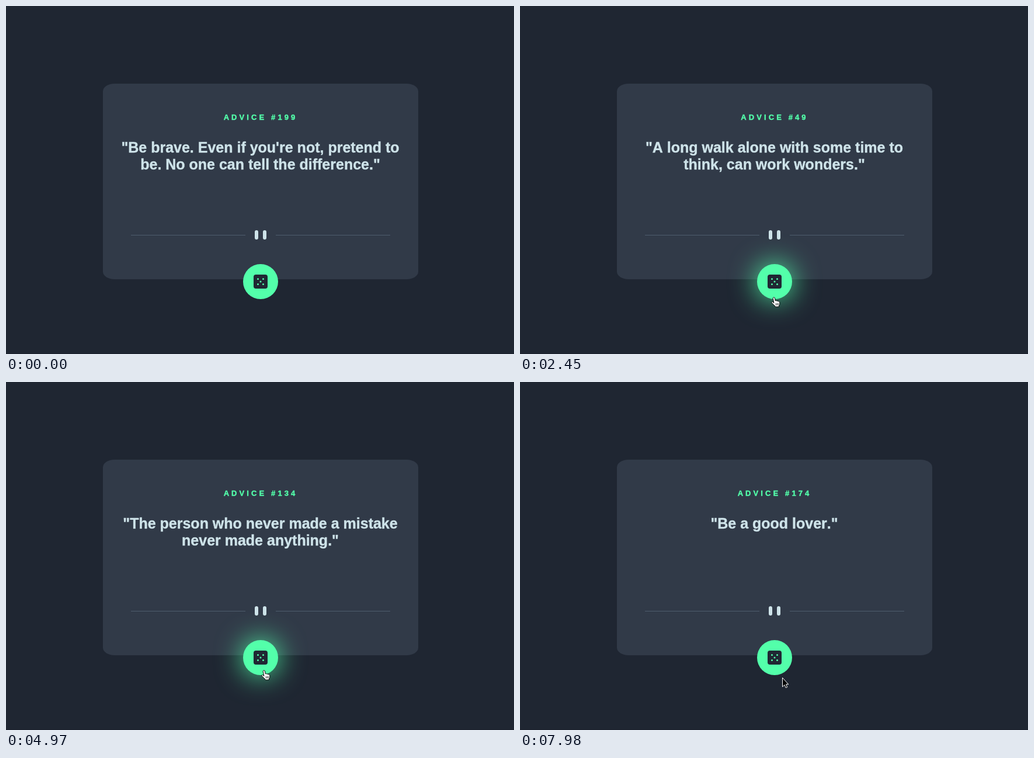
Write an HTML page that moves like this. It is 870 px wide and 596 px high and loops after 8000 ms.

```html
<!DOCTYPE html>
<html lang="en">
<head>
<meta charset="utf-8">
<title>Advice card</title>
<style>
  html, body { margin: 0; width: 100%; height: 100%; overflow: hidden; background: #1f2632; }
  svg { display: block; }
  text { font-family: "Liberation Sans", Helvetica, Arial, sans-serif; font-weight: bold; font-kerning: none; text-anchor: middle; stroke-width: .4px; }
  .label { font-size: 13px; letter-spacing: 4.1px; fill: #53ffaa; stroke: #53ffaa; }
  .quote { font-size: 25px; fill: #cee3e9; stroke: #cee3e9; }
  #glow { filter: blur(24px); }
</style>
</head>
<body>
<svg width="870" height="596" viewBox="0 0 870 596">
  <rect width="870" height="596" fill="#1f2632"/>
  <rect y="595" width="870" height="1" fill="#1b212c"/>
  <rect x="166" y="133" width="540" height="335" rx="20" ry="13" fill="#313a48"/>
  <text id="label" class="label" x="436" y="195"/>
  <text id="line1" class="quote" x="435.5" y="251"/>
  <text id="line2" class="quote" x="435.5" y="280"/>

  <path d="M214 392h196v1H214zM462 392h196v1H462z" fill="#4f5d6e"/>
  <path d="M429 387v10M443 387v10" stroke="#cee3e9" stroke-width="6" stroke-linecap="round"/>

  <circle id="glow" cx="436" cy="472" r="30" fill="#53ffaa"/>
  <circle cx="436" cy="472" r="30" fill="#53ffaa"/>
  <g transform="translate(424 460)">
    <rect width="24" height="24" rx="4" fill="#202733"/>
    <path d="M7.5 7.5h0M16.5 7.5h0M12 12h0M7.5 16.5h0M16.5 16.5h0" stroke="#53ffaa" stroke-width="3" stroke-linecap="round"/>
  </g>

  <g id="cursor">
    <g id="ring" fill="none">
      <circle r="29" stroke="#fff" stroke-width="5.4"/>
      <circle r="29" stroke="#000" stroke-width="3.2"/>
    </g>
    <path id="arrow" d="M.5 .5V16L4 12.7L6.2 17.6L8.7 16.6L6.6 11.8H10.8Z" stroke="#fff"/>
    <g id="hand" stroke="#000" stroke-linejoin="round" stroke-linecap="round">
      <path d="M-1.8 2.2C-1.8 .6 .8 .4 1.3 2L2.4 7C3 6 4.6 6.2 4.9 7.4C5.6 6.6 7 6.9 7.3 8C8.2 7.4 9.6 8 9.7 9.4C10 12 9.6 13.5 8.6 15.2L8.4 17L2.4 17.2L1.6 15.6C-.5 14-2 12.2-3.8 10.4C-4.8 9.2-3.2 8-1.8 9L-.4 10.4Z" fill="#fff"/>
      <path d="M3.2 11.5l.2 2.6M5.3 11.3l.1 2.8M7.3 11.2v2.8" fill="none" stroke-width=".8"/>
    </g>
  </g>
</svg>
<script>
const LOOP = 8000, STEP = 70;
const REPLY = 4 * STEP; // from a click to the next advice
const button = { x: 436, y: 472, r: 30 };

const advice = [
  { click: -REPLY, number: 199, lines: [`"Be brave. Even if you're not, pretend to`, `be. No one can tell the difference."`] },
  { click: 1960, number: 49, lines: [`"A long walk alone with some time to`, `think, can work wonders."`] },
  { click: 4130, number: 134, lines: [`"The person who never made a mistake`, `never made anything."`] },
  { click: 7140, number: 174, lines: [`"Be a good lover."`, ""] },
];

// The pointer rests between moves.
const entry = { time: 210, x: 449, y: 534 };
const moves = [
  { from: 210, to: 980, x: 441, y: 510 },
  { from: 1050, to: 1470, x: 432, y: 484 },
  { from: 2240, to: 3010, x: 447, y: 558 },
  { from: 3080, to: 3710, x: 438, y: 475 },
  { from: 4760, to: 5250, x: 447, y: 520 },
  { from: 5950, to: 6580, x: 441, y: 477 },
  { from: 7770, to: 7980, x: 449, y: 506 },
];

const $ = id => document.getElementById(id);
const show = (id, on) => $(id).setAttribute("visibility", on ? "visible" : "hidden");

function ease(t, from, to) {
  const u = Math.min(1, Math.max(0, (t - from) / (to - from)));
  return u * u * (3 - 2 * u);
}

function pointerAt(t) {
  let { x, y } = entry;
  for (const m of moves) {
    const k = ease(t, m.from, m.to);
    x += (m.x - x) * k;
    y += (m.y - y) * k;
  }
  return [Math.round(x), Math.round(y)];
}

function draw(now) {
  const t = Math.floor(now % LOOP / STEP) * STEP;

  const { number, lines } = advice.findLast(a => a.click + REPLY <= t);
  $("label").textContent = "ADVICE #" + number;
  $("line1").textContent = lines[0];
  $("line2").textContent = lines[1];

  const [x, y] = pointerAt(t);
  const visible = t >= entry.time;
  const hover = visible && Math.hypot(x - button.x, y - button.y) < button.r;
  $("cursor").setAttribute("transform", `translate(${x} ${y})`);
  show("glow", hover);
  show("hand", hover);
  show("arrow", visible && !hover);
  show("ring", advice.some(a => a.click === t));
}

function tick() {
  draw(performance.now());
  requestAnimationFrame(tick);
}
tick();
</script>
</body>
</html>
```
